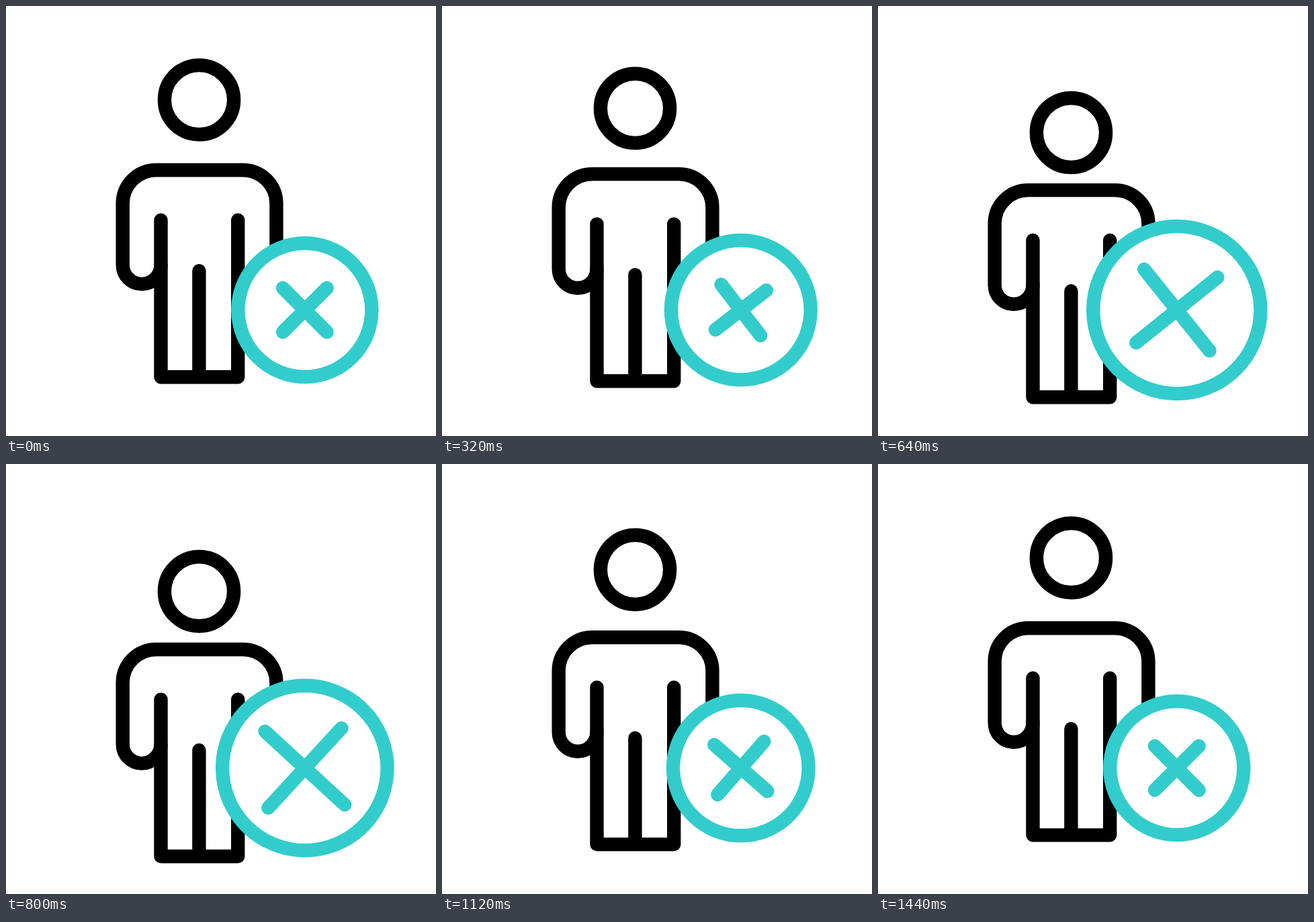
An HTML page for the animation above (1.68 s loop, 640x640 px).

```html
<!DOCTYPE html>
<html lang="en">
<head>
<meta charset="utf-8">
<title>Person removed</title>
<style>
  html, body { margin: 0; width: 100%; height: 100%; overflow: hidden; background: #fff; }
  svg { display: block; width: 100%; height: 100%; }
  .ink { fill: none; stroke: #000; }
  .badge { fill: #fff; stroke: #3cc; }
  svg * { stroke-width: 20.4px; stroke-linecap: round; stroke-linejoin: round; }
</style>
</head>
<body>
<svg viewBox="0 0 640 640">
  <g class="ink">
    <circle id="head" cx="287.5" cy="139.7" r="51.6"/>
    <g id="body">
      <path d="M402.4 400V294a49.7 49.7 0 0 0-49.7-49.8H223.4A49.7 49.7 0 0 0 173.7 294v91.5a28.4 28.4 0 0 0 56.8 0"/>
      <path d="M230.5 318.7V552.3H345.2V318.7M287.4 394.2V552.3"/>
    </g>
  </g>
  <g class="badge" transform="translate(444.8 452.5)">
    <circle id="ring"/>
    <path id="cross"/>
  </g>
</svg>
<script>
const LOOP = 1680, STEP = 40, REST = 1440;
const [head, body, ring, cross] = ['head', 'body', 'ring', 'cross'].map(id => document.getElementById(id));

// Cubic timing curve with horizontal handles at x = a and x = b.
const curve = (a, b) => x => {
  let lo = 0, hi = 1;
  for (let i = 0; i < 24; i++) {
    const s = (lo + hi) / 2, q = 1 - s;
    if (3 * a * s * q * q + 3 * b * s * s * q + s ** 3 < x) lo = s; else hi = s;
  }
  return lo * lo * (3 - 2 * lo);
};
const rise = curve(.58, .5), fall = curve(.5, .42);

const tween = (t, t0, t1, ease) => ease(Math.min(1, Math.max(0, (t - t0) / (t1 - t0))));
const pulse = (t, start, peak, end) =>
  t < peak ? tween(t, start, peak, rise) : 1 - tween(t, peak, end, fall);

function tilt(t) {
  return 10 * tween(t, 130, 425, rise)
    - 15 * tween(t, 425, 960, rise)
    + 5 * tween(t, 960, 1380, rise);
}

function draw(t) {
  head.setAttribute('transform', `translate(0 ${50.5 * pulse(t, 40, 740, 1440)})`);
  body.setAttribute('transform', `translate(0 ${31.8 * pulse(t, 72, 772, 1468)})`);
  ring.setAttribute('r', 99.5 + 25.3 * pulse(t, 130, 680, 1232));
  const d = (46.4 + 34.4 * pulse(t, 213, 765, 1310)) * Math.SQRT1_2;
  cross.setAttribute('d', `M${-d} ${-d}L${d} ${d}M${-d} ${d}L${d} ${-d}`);
  cross.setAttribute('transform', `rotate(${tilt(t)})`);
}

let start;
function tick(now) {
  start ??= now;
  const t = (now - start + .5) % LOOP;
  draw(Math.min(REST, Math.floor(t / STEP) * STEP));
  requestAnimationFrame(tick);
}
draw(0);
requestAnimationFrame(tick);
</script>
</body>
</html>
```
